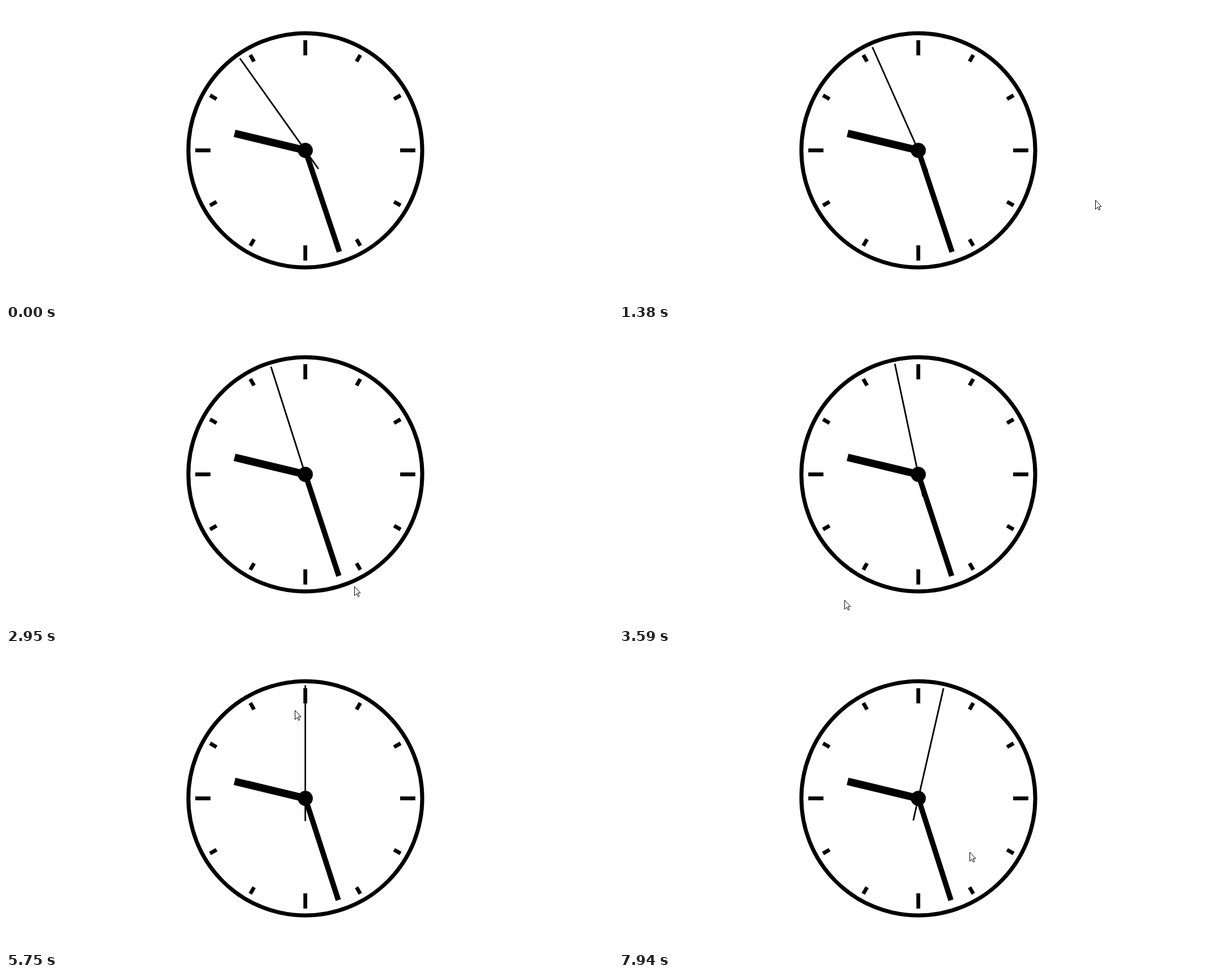
An HTML page for the animation above (8000 ms loop, 1072 by 522 pixels).

```html
<!DOCTYPE html>
<html lang="en">
<head>
<meta charset="utf-8">
<title>Clock</title>
<style>
  html, body { margin: 0; width: 100%; height: 100%; overflow: hidden; background: #fff; }
  svg { display: block; width: 1072px; height: 522px; }
  #clock { stroke: #000; fill: none; }
</style>
</head>
<body>
<svg viewBox="0 0 1072 522">
  <g id="clock" transform="translate(528.6 254.6)">
    <circle r="206.5" stroke-width="7"/>
    <g id="marks" stroke-width="6.8"/>
    <path d="M0 0V-128.5" stroke-width="13.3" transform="rotate(283.5)"/>
    <path id="minute" d="M0 0V-188.7" stroke-width="9.5"/>
    <path id="second" d="M0 40V-199.3" stroke-width="2.8"/>
    <circle r="13.3" fill="#000" stroke="none"/>
  </g>
  <path id="cursor" d="M.5 .5V16.5L4.2 12.9L6.7 18L8.8 17L6.4 11.8H11Z" fill="#fff" stroke="#000"/>
</svg>
<script>
const LOOP = 8000;
const TICK = { first: -65, every: 990, lasts: 350 };

// Places the pointer passes or rests at
const stops = [
  { t: 400, x: 962, y: 521 },
  { t: 850, x: 841, y: 342 },
  { t: 1800, x: 841, y: 342 },
  { t: 2170, x: 824, y: 356 },
  { t: 2640, x: 713, y: 430 },
  { t: 3590, x: 398, y: 476 },
  { t: 3900, x: 318, y: 400 },
  { t: 4750, x: 431, y: 152 },
  { t: 5600, x: 510, y: 99 },
  { t: 5750, x: 510, y: 99 },
  { t: 7400, x: 610, y: 318 },
  { t: 7800, x: 610, y: 318 },
  { t: 7920, x: 619, y: 349 }
];

const find = id => document.getElementById(id);
const minute = find('minute'), second = find('second'), cursor = find('cursor');
const rotate = (el, deg) => el.setAttribute('transform', `rotate(${deg})`);
const smooth = u => u * u * (3 - 2 * u);

for (let hour = 0; hour < 12; hour++) {
  const inner = hour % 3 ? 181 : 167.5;
  find('marks').innerHTML += `<path d="M0 ${-inner}V-194.3" transform="rotate(${hour * 30})"/>`;
}

// Each tick glides for a moment, then rests
function ticksAt(t) {
  const since = t - TICK.first;
  const part = since % TICK.every / TICK.lasts;
  return Math.floor(since / TICK.every) + smooth(Math.min(1, part));
}

const slope = (a, b, axis) => (b[axis] - a[axis]) / (b.t - a.t);

// Monotone tangent, so the pointer never overshoots a stop
function tangent(i, axis) {
  if (i === 0) return slope(stops[0], stops[1], axis);
  if (i === stops.length - 1) return 0;
  const a = slope(stops[i - 1], stops[i], axis), b = slope(stops[i], stops[i + 1], axis);
  return a * b > 0 ? 2 * a * b / (a + b) : 0;
}

function pointer(t, axis) {
  const next = stops.findIndex(stop => t < stop.t);
  if (next < 0) return stops[stops.length - 1][axis];
  const a = stops[next - 1], b = stops[next], span = b.t - a.t;
  const u = (t - a.t) / span, v = 1 - u;
  const bend = v * tangent(next - 1, axis) - u * tangent(next, axis);
  return Math.round(smooth(v) * a[axis] + smooth(u) * b[axis] + span * u * v * bend);
}

function draw(t) {
  const ticks = ticksAt(t);
  rotate(second, -36 + 6 * ticks);
  rotate(minute, 161.4 + 0.1 * ticks);

  const visible = t >= stops[0].t;
  cursor.style.display = visible ? '' : 'none';
  if (visible) cursor.setAttribute('transform', `translate(${pointer(t, 'x')} ${pointer(t, 'y')})`);
}

const begin = performance.now();
function frame() {
  draw((performance.now() - begin) % LOOP);
  requestAnimationFrame(frame);
}
frame();
</script>
</body>
</html>
```
